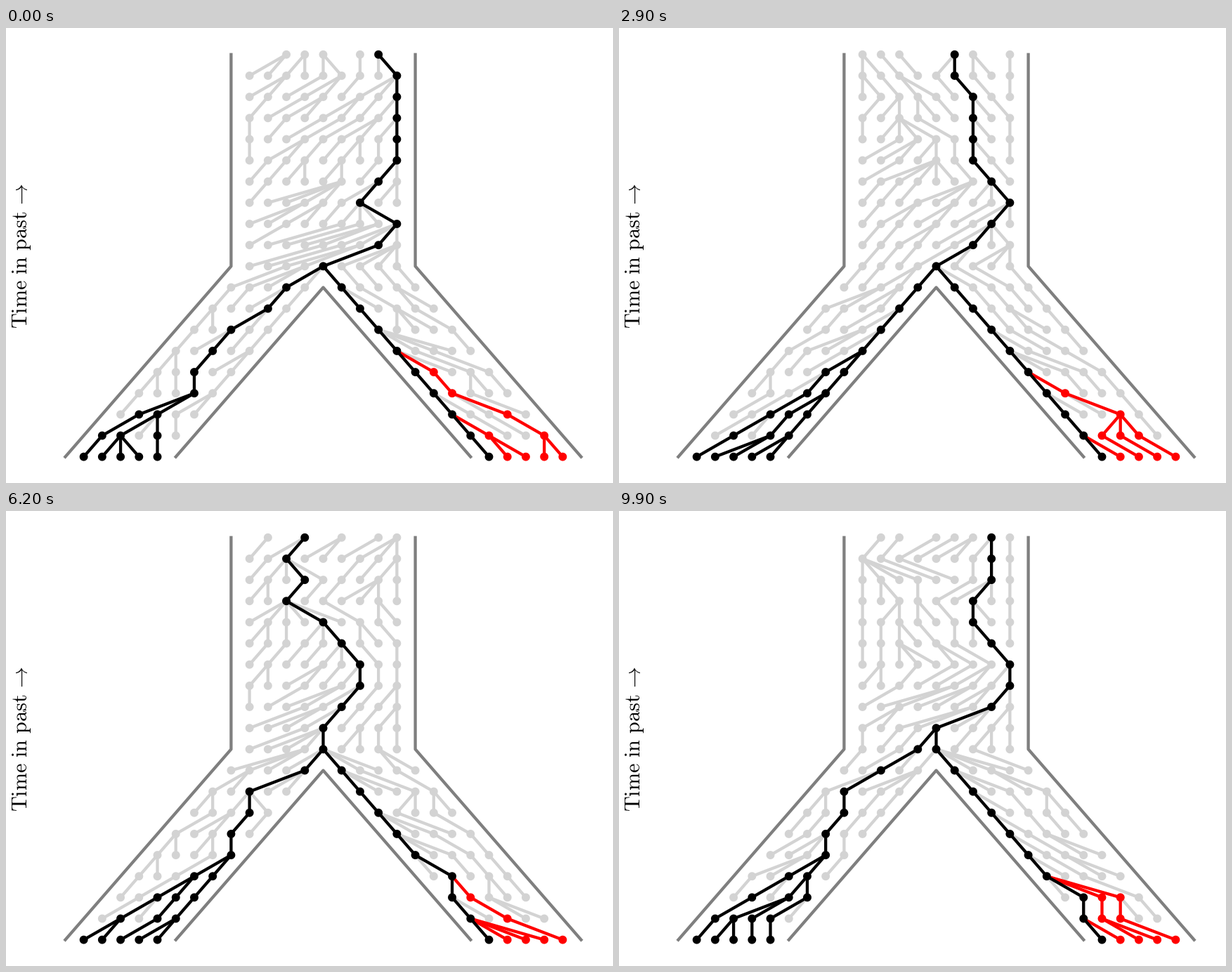
These frames come from a looping animation (864 px wide and 648 px high, 10 s). A matplotlib script:

```python
import random

import matplotlib.pyplot as plt
from matplotlib.animation import FuncAnimation
from matplotlib.collections import LineCollection

W, H, DPI = 864, 648, 72
FRAMES, INTERVAL = 100, 100
X0, DX = 320.4, 26.22      # column 0 is the left wall of the trunk
Y0, DY = 37.8, 30.15
SPLIT, LAST = 10, 19       # row where the population splits, sampled row
MERGED = 14                # each branch has one ancestor by this row
LEFT, RIGHT = range(-8, -3), range(14, 19)

plt.rcParams["mathtext.fontset"] = "cm"


def pos(row, col):
    return X0 + DX * col, Y0 + DY * row


def populations(row):
    """First and last column, shift to the parents' columns, lean."""
    if row <= SPLIT:
        return [(1, 9, 0, 1 - 0.045 * row)]
    return [(11 - row, 15 - row, 1, 0.85), (row - 5, row - 1, -1, 1.3)]


def pick_parents(rng):
    """Wright-Fisher sampling, sorted so that no lines cross."""
    parent = {}
    for row in range(1, LAST + 1):
        for lo, hi, shift, lean in populations(row):
            size = hi - lo + 1
            draws = sorted(int(size * rng.random() ** lean)
                           for _ in range(size))
            for i, d in enumerate(draws):
                parent[row, lo + i] = (row - 1, lo + shift + d)
    return parent


def ancestors(parent, cols, row):
    nodes = {(LAST, c) for c in cols}
    for _ in range(LAST - row):
        nodes = {parent[n] for n in nodes}
    return nodes


def genealogy(frame):
    rng = random.Random(frame)
    while True:
        parent = pick_parents(rng)
        if all(len(ancestors(parent, cols, MERGED)) == 1
               for cols in (LEFT, RIGHT)):
            return parent


def trace(parent, cols, stop=()):
    """Edges from the samples upwards until a node in stop."""
    edges = {}
    for col in cols:
        node = (LAST, col)
        while node in parent and node not in stop and node not in edges:
            edges[node] = parent[node]
            node = parent[node]
    return edges


fig = plt.figure(figsize=(W / DPI, H / DPI), dpi=DPI, facecolor="white")
ax = fig.add_axes([0, 0, 1, 1])
ax.set(xlim=(0, W), ylim=(H, 0))
ax.axis("off")

for wall in ([(0, 0), (SPLIT, 0), (LAST, -9)],
             [(0, 10), (SPLIT, 10), (LAST, 19)],
             [(LAST, -3), (SPLIT + 1, 5), (LAST, 13)]):
    ax.plot(*zip(*(pos(*p) for p in wall)), color="#7f7f7f", lw=4.3,
            solid_capstyle="projecting", solid_joinstyle="round",
            snap=False, zorder=1)

ax.text(30, 427.5, r"$\mathrm{Time\ in\ past}\,\rightarrow$", fontsize=30.2,
        rotation=90, rotation_mode="anchor", ha="left", va="baseline")


def strokes(color, width, zorder):
    lines = LineCollection([], colors=color, linewidths=width,
                           capstyle="round", snap=False, zorder=zorder)
    return ax.add_collection(lines, autolim=False)


class Layer:
    def __init__(self, color, zorder):
        self.lines = strokes(color, 4.3, zorder)
        self.dots = strokes(color, 12, zorder + 1)

    def show(self, edges, skip=()):
        self.lines.set_segments([[pos(*a), pos(*b)] for a, b in edges.items()])
        nodes = (set(edges) | set(edges.values())) - set(skip)
        # a round-capped stroke of almost no length is a dot
        self.dots.set_segments([[(x, y), (x + 0.01, y)]
                                for x, y in (pos(*n) for n in nodes)])


grey, red, black = Layer("#d3d3d3", 2), Layer("#ff0000", 4), Layer("#000000", 6)


def update(frame):
    parent = genealogy(frame)
    main = trace(parent, [*LEFT, RIGHT[0]])
    others = trace(parent, RIGHT[1:], main)
    grey.show({k: v for k, v in parent.items()
               if k not in main and k not in others})
    red.show(others, skip=main)
    black.show(main)


anim = FuncAnimation(fig, update, frames=FRAMES, interval=INTERVAL, repeat=True)
plt.show()
```
